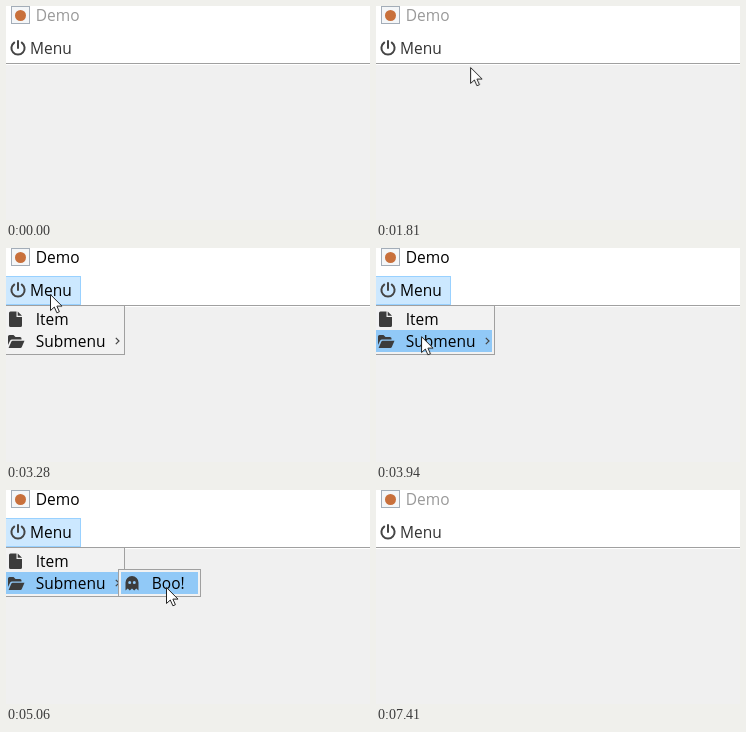
Animation, 364 px wide and 214 px high, one loop 7.58 s. Source, as an HTML page:

```html
<!DOCTYPE html>
<html lang="en">
<head>
<meta charset="utf-8">
<title>Menu demo</title>
<style>
  html, body { margin: 0; width: 100%; height: 100%; overflow: hidden; background: #f0f0f0; }
  svg { display: block; width: 364px; height: 214px; }
  text { font: 15.5px "Open Sans", "Noto Sans", sans-serif; fill: #000; }
  .icon { fill: #3c3c3c; }
  .popup { fill: #f2f2f2; stroke: #a0a0a0; }
  .row { fill: #91c9f7; }
  .line { fill: none; stroke: #444; }

  .title, .label, .button, .menu, .item, .branch, .submenu, .leaf, .click {
    animation: 7580ms step-end infinite;
  }
  .menu, .item, .branch, .submenu, .leaf, .click { visibility: hidden; }
  .title { animation-name: title; }
  .label { animation-name: label; }
  .button { animation-name: button; }
  .menu { animation-name: menu; }
  .item { animation-name: item; }
  .branch { animation-name: branch; }
  .submenu { animation-name: submenu; }
  .leaf { animation-name: leaf; }
  .click { animation-name: click; }
  .pointer { animation: pointer 7580ms linear infinite; }

  @keyframes title {
    0%, 97.757% { fill: #999; }
    30.607% { fill: #000; }
  }
  @keyframes label {
    0%, 73.351% { fill: #333; }
    30.607% { fill: #000; }
  }
  @keyframes button {
    0%, 73.351% { fill: transparent; stroke: transparent; }
    30.607% { fill: #e5f3ff; stroke: #cce8ff; }
    31.135% { fill: #cce8ff; stroke: #99d1ff; }
  }
  @keyframes menu {
    0%, 73.351% { visibility: hidden; }
    31.135% { visibility: visible; }
  }
  @keyframes item {
    0%, 48.681% { visibility: hidden; }
    45.119% { visibility: visible; }
  }
  @keyframes branch {
    0%, 73.351% { visibility: hidden; }
    48.681% { visibility: visible; }
  }
  @keyframes submenu {
    0%, 73.351% { visibility: hidden; }
    53.958% { visibility: visible; }
  }
  @keyframes leaf {
    0%, 73.351% { visibility: hidden; }
    61.741% { visibility: visible; }
  }
  @keyframes click {
    0%, 36.016%, 73.879% { visibility: hidden; }
    30.607%, 71.636% { visibility: visible; }
  }
  @keyframes pointer {
    0% { transform: translate(326px, 220px); animation-timing-function: step-end; }
    13.325% { transform: translate(325px, 207px); animation-timing-function: cubic-bezier(.33, .2, .67, .5); }
    17.81% { transform: translate(259px, 144px); }
    23.087% { transform: translate(111px, 68px); animation-timing-function: cubic-bezier(.3, .45, .6, 1); }
    27.968% { transform: translate(44px, 40px); }
    40.897% { transform: translate(44px, 40px); animation-timing-function: ease-in-out; }
    50.264%, 51.187% { transform: translate(44px, 85px); }
    51.979% { transform: translate(45px, 88px); animation-timing-function: cubic-bezier(.4, .1, .67, .6); }
    60.422% { transform: translate(99px, 93px); animation-timing-function: cubic-bezier(.33, .28, .6, 1); }
    66.755% { transform: translate(160px, 97px); }
    80.607% { transform: translate(160px, 97px); animation-timing-function: cubic-bezier(.45, .05, .75, .6); }
    88.918%, 100% { transform: translate(310px, 216px); }
  }
</style>
</head>
<body>
<svg viewBox="0 0 364 214">
  <rect width="364" height="214" fill="#f0f0f0"/>
  <rect width="364" height="59" fill="#fff"/>

  <!-- Title bar -->
  <rect x="5.5" y=".5" width="18" height="17" fill="#f4f6f8" stroke="#a3adb8"/>
  <circle cx="14.5" cy="9.5" r="5.5" fill="#c8703c"/>
  <text class="title" x="29.8" y="15">Demo</text>

  <!-- Menu bar -->
  <rect class="button" x="-.5" y="28.5" width="75" height="28"/>
  <path d="M0 57.5H364" stroke="#a0a0a0"/>
  <path class="line" stroke-width="2" stroke-linecap="round" d="M8.2 36.6a6.6 6.6 0 1 0 7.6 0M12 35v7"/>
  <text class="label" x="24" y="48">Menu</text>

  <g class="menu">
    <rect class="popup" x="-2.5" y="57.5" width="121" height="49"/>
  </g>
  <rect class="row item" y="60" width="116" height="22"/>
  <rect class="row branch" y="82" width="116" height="22"/>
  <g class="menu">
    <path class="icon" d="M4.5 63.5H10.5V69H16V77.5Q16 79 14.5 79H4.5Q3 79 3 77.5V65Q3 63.5 4.5 63.5ZM11.7 63.5L16 67.8H11.7Z"/>
    <text x="29.8" y="77">Item</text>
    <path class="icon" d="M2 97V88.5Q2 87 3.5 87H7.5L9.5 89H14Q15.5 89 15.5 90.5V91.5H6Q4.8 91.5 4.2 92.6ZM2.6 100L5.4 93.5Q5.8 92.7 6.7 92.7H18.5L15.7 99.2Q15.3 100 14.4 100Z"/>
    <text x="29.8" y="99">Submenu</text>
    <path class="line" stroke-width="1.2" d="M109.8 89.8L113 93L109.8 96.2"/>
  </g>

  <g class="submenu">
    <rect class="popup" x="112.5" y="79.5" width="82" height="27"/>
  </g>
  <rect class="row leaf" x="115" y="82" width="77" height="22"/>
  <g class="submenu">
    <path class="icon" fill-rule="evenodd" d="M119.5 100.5V92.5a6.5 6.5 0 0 1 13 0V100.5L130.3 98.6L128.2 100.5L126 98.6L123.8 100.5L121.7 98.6ZM122.2 92.5a1.5 1.5 0 1 0 3 0a1.5 1.5 0 1 0-3 0ZM126.8 92.5a1.5 1.5 0 1 0 3 0a1.5 1.5 0 1 0-3 0Z"/>
    <text x="145.8" y="99">Boo!</text>
  </g>

  <g class="pointer">
    <circle class="click" r="15" fill="#ff0" opacity=".6"/>
    <path d="M.5 .6V16.5L4.3 13L6.9 18.8L9.4 17.7L6.9 12.1H12Z" fill="#fff" stroke="#222"/>
  </g>
</svg>
</body>
</html>
```
